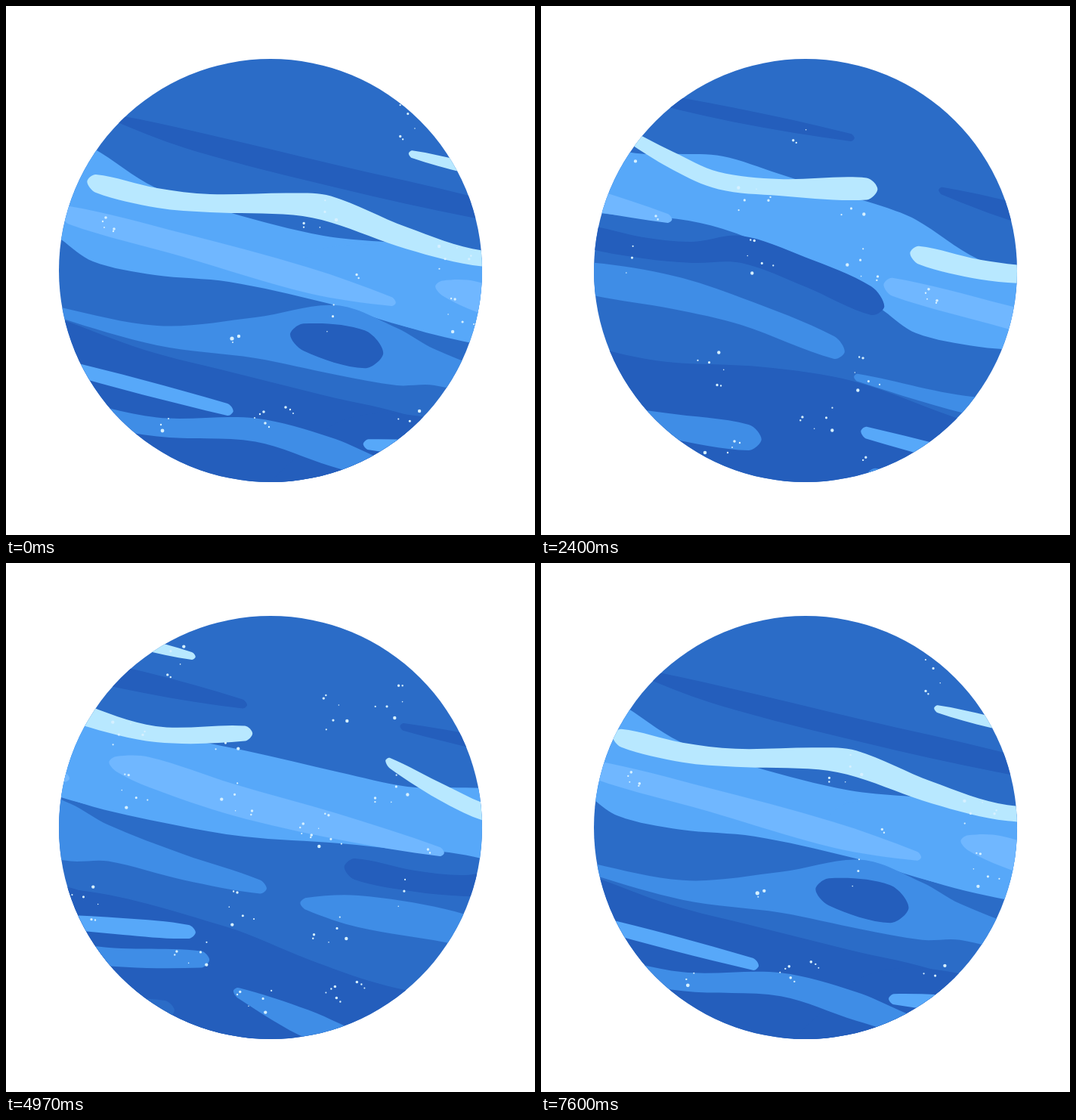
An HTML page with a canvas that plays this animation: 700x700 px, repeating every 7.66 s.

```html
<!DOCTYPE html>
<html lang="en">
<head>
<meta charset="utf-8">
<title>Blue planet</title>
<style>
html, body { margin: 0; width: 100%; height: 100%; overflow: hidden; background: #fff; }
canvas { display: block; width: 700px; height: 700px; }
</style>
</head>
<body>
<canvas id="stage" width="700" height="700"></canvas>
<script>
const ctx = document.getElementById('stage').getContext('2d');
const LOOP = 7660, STEPS = 96, DX = 12.7, DY = 3.16;
const BASE = '#2b6cc7', DARK = '#245ebc', MID = '#3f8de6', LIGHT = '#57a8f9',
      SOFT = '#70b7ff', PALE = '#b8e8ff', STAR = '#d6f0ff';
const layers = [];
const parse = text => text.split(',').map(part => part.trim().split(' ').map(Number));

// Closed smooth curve through the points.
function smooth(pts) {
  const path = new Path2D();
  const at = i => pts[(i + pts.length) % pts.length];
  const dist = (a, b) => Math.hypot(b[0] - a[0], b[1] - a[1]);
  const handle = (i, len) => {
    const a = at(i - 1), p = at(i), b = at(i + 1);
    const s = len / 3 / (dist(a, p) + dist(p, b));
    return [p[0] + (b[0] - a[0]) * s, p[1] + (b[1] - a[1]) * s];
  };
  path.moveTo(...pts[0]);
  for (let i = 0; i < pts.length; i++) {
    const len = dist(at(i), at(i + 1));
    path.bezierCurveTo(...handle(i, len), ...handle(i + 1, -len), ...at(i + 1));
  }
  path.closePath();
  return path;
}

// Rounded tip beyond the end of a ribbon.
function tip([x, y, w], [px, py]) {
  const len = Math.hypot(x - px, y - py);
  return [x + (x - px) / len * w, y + (y - py) / len * w];
}

// Ribbon along "x y halfHeight" stations, placed as at the given step of the drift.
function ribbon(color, step, text) {
  const spine = parse(text).map(([x, y, w = 200]) => [x, y, w]);
  const n = spine.length;
  const edge = sign => spine.map(([x, y, w]) => [x, y + sign * w]);
  layers.push({ color, step, path: smooth([
    tip(spine[0], spine[1]), ...edge(-1),
    tip(spine[n - 1], spine[n - 2]), ...edge(1).reverse()
  ]) });
}

function stars(steps, list) {
  const path = new Path2D();
  list.forEach(([x, y, r], i) => {
    r = r || [1.8, 1.2, 1][i % 3];
    path.moveTo(x + r, y);
    path.arc(x, y, r, 0, 7);
  });
  for (const step of steps) layers.push({ color: STAR, step, path });
}

// One constellation, turned and flipped, at each "x y degrees".
const GROUP = parse('0 0 2.2,13 -13 1.6,28 -10 1.1,-6 -23 .8,3 -43 1.7,-2 -44 1.2');
function cluster(steps, text, flip = 1, from = 0, to = 6) {
  for (const [x, y, turn] of parse(text)) {
    const c = Math.cos(turn * Math.PI / 180), s = Math.sin(turn * Math.PI / 180);
    stars(steps, GROUP.slice(from, to).map(([u, v, r]) =>
      [x + flip * u * c - v * s, y + flip * u * s + v * c, r]));
  }
}

// Broad bands
ribbon(DARK, 0, '650 800,545 746,420 715,300 685,183 655,33 602,-87 583,-216 576,-296 560,-386 529,-497 485,-702 436,-799 460');
ribbon(BASE, 75, '300 634 14,375 633 13');
ribbon(LIGHT, 0, '650 395 30,566 377 55,420 348 44,295 319 46,197 298 58,115 263 75,73 240 69,23 214 58,-67 178 51,-141 152 48,-201 144 43,-256 142 42,-346 128 47,-472 109 57,-567 92 58,-687 68 54,-799 47 30');

// Soft streaks
ribbon(SOFT, 0, '84 277 12,233 316 15.5,400 363 17,510 391 6');
ribbon(SOFT, 62, '146 266 10,190 277 20,300 313 21,440 349 17,574 382 6');

// Middle-blue swirls
ribbon(MID, 0, '38 397 5,200 436 13,330 439 27,437 442 46,517 464 38,567 478 24,667 510 17,768 536 9');
ribbon(MID, 43, '156 391 8,225 401 21,340 420 22,430 445 18,553 493 15');
ribbon(MID, 43, '66 509 7,159 551 19.5,240 579 14,330 596 16.5,440 612 17');
ribbon(MID, 0, '62 530 13,200 557 12.5,330 561 15.5,430 590 19,537 625 12.5,690 632 11');

// Light bars
ribbon(LIGHT, 75, '213 514 7,320 522 11,407 529 9');
ribbon(LIGHT, 0, '50 470 8,293 534 8');

// Dark streaks and the storm
ribbon(DARK, 43, '220 345 14,300 361 14,365 367 14,430 363 18,515 393 19.5,602 431 19');
ribbon(DARK, 43, '285 157 5,420 185 9.5,575 215 5');
ribbon(DARK, 0, '150 150 5,250 179 13,440 226 15,617 266 14,745 294 6');
ribbon(DARK, 75, '127 372 18,208 388 25');

// Pale clouds
ribbon(PALE, 0, '119 235 12,200 254 13,270 261 12,380 262 14.5,430 269 17.5,530 307 14.5,630 334 10.5,748 333 10');
ribbon(PALE, 43, '267 205 7,340 246 12,400 272 11.5,480 281 11,596 283 14.5');
ribbon(PALE, 75, '271 130 5,340 147 7.5,411 164 5');

// Stars
cluster([21, 62.45], '147 212 109,165 325 0,305 480 5,121 430 179,271 533 -70');
cluster([21, 62.45], '291 314 115', -1);
cluster([21, 62.45], '313 247 -21', -1, 0, 3);
cluster([62.45], '349 596 -55,241 112 206');
cluster([21], '349 596 -55,241 112 206', 1, 3);
cluster([0, 54.57], '437 283 260');
cluster([0, 54.57], '447 422 -97', 1, 1, 4);
cluster([0, 54.57], '498 329 228', 1, 4);
cluster([0], '550 140 217');
cluster([43], '209 437 -87,173 315 13');
cluster([43], '273 145 11,210 149 -42', -1);
cluster([75], '370 113 -25', -1);
stars([0, 54.57], parse('370 531,376 534,380 539,341 537,336 540,329 545,343 552,348 557'));
stars([0, 41.43], parse('132 280,128 285,130 293,143 295,142 298'));
stars([0], parse('299 440 2.6,308 437 2.2,300 445,207 562 2.4,205 554,215 546'));
stars([30, 71.4], parse('256 576,263 578,253 584,217 591 2.3,247 591'));

// Five drift steps every 400 ms, held unevenly.
function stepAt(ms) {
  const t = ms % LOOP, rest = t % 400;
  return 5 * Math.floor(t / 400) + [100, 170, 270, 330].filter(edge => rest >= edge).length;
}

function draw() {
  const now = stepAt(performance.now());
  ctx.fillStyle = '#fff';
  ctx.fillRect(0, 0, 700, 700);
  ctx.save();
  ctx.beginPath();
  ctx.arc(350, 350, 280, 0, 7);
  ctx.fillStyle = BASE;
  ctx.fill();
  ctx.clip();
  for (const { color, step, path } of layers) {
    ctx.fillStyle = color;
    for (const lap of [-STEPS, 0, STEPS]) {
      const move = now - step + lap;
      ctx.save();
      ctx.translate(move * DX, move * DY);
      ctx.fill(path);
      ctx.restore();
    }
  }
  ctx.restore();
  requestAnimationFrame(draw);
}
draw();
</script>
</body>
</html>
```
